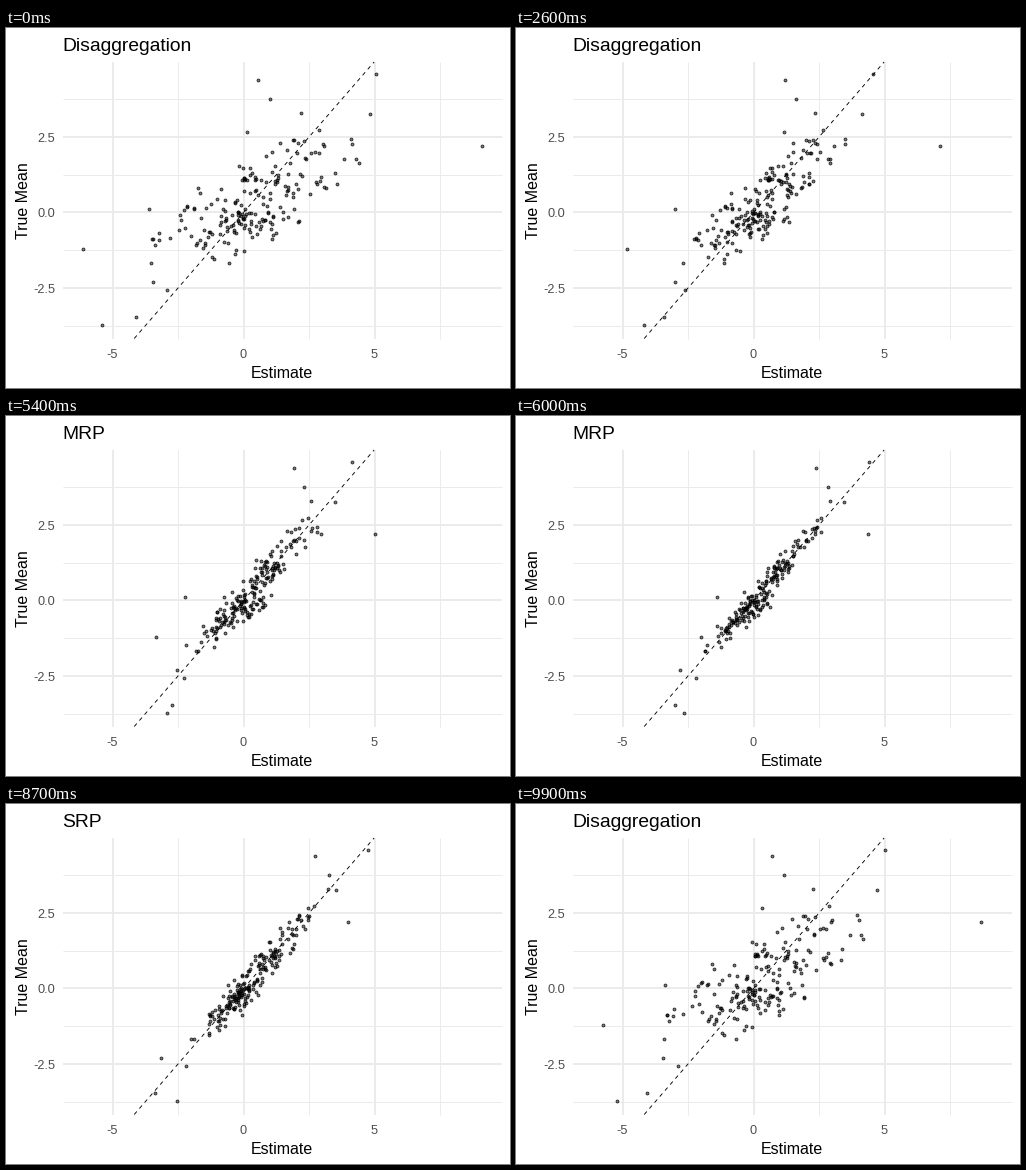
Animation, 504 px wide and 360 px high, one loop 10000 ms. Source, as a matplotlib script:

```python
import numpy as np
import matplotlib
import matplotlib.pyplot as plt
from matplotlib.animation import FuncAnimation

matplotlib.rcParams["font.family"] = "Liberation Sans"

W, H = 504, 360
X0, Y0 = 237.7, 184.3        # pixel position of the data origin
SX, SY = 26.2, 30.2          # pixels per unit
LEFT, RIGHT, TOP, BOTTOM = 57, 496, 34, 310.5

FRAMES = 100
STEPS = 14                   # frames in one transition
STARTS = (19, 53, 86)        # last resting frame of each state
TITLES = ("Disaggregation", "MRP", "SRP")

# Extreme points: true mean, then the estimate in each state
OUTLIERS = np.array([
    (4.37, 0.53, 1.83, 2.90), (4.57, 5.04, 4.08, 4.73),
    (3.74, 0.99, 2.21, 3.44), (2.19, 9.08, 5.11, 3.59),
    (3.28, 2.18, 2.52, 3.28), (3.25, 4.81, 3.47, 3.44),
    (0.10, -3.63, -2.40, -0.38), (-1.23, -6.15, -3.55, -0.50),
    (-2.32, -3.47, -2.52, -3.13), (-2.58, -2.94, -2.29, -2.14),
    (-3.48, -4.12, -2.71, -3.32), (-3.74, -5.42, -2.98, -2.33),
])


def px(x):
    return X0 + SX * x


def py(y):
    return Y0 - SY * y


def make_cloud():
    """Main scatter, closing in on the diagonal from state to state."""
    rng = np.random.default_rng(12)

    def noise(n):
        return np.clip(rng.standard_normal(n), -2.1, 2.1)

    # mean, spread and size of each cluster of true means
    clusters = ((2.0, 0.4, 26), (0.85, 0.38, 62),
                (-0.2, 0.3, 76), (-1.0, 0.33, 32))
    y = np.concatenate([m + s * noise(n) for m, s, n in clusters])
    wide = (1.1 + 0.15 * np.abs(y)) * noise(len(y))
    return np.column_stack([
        y,
        y + wide,
        0.95 * y + 0.1 * wide + 0.42 * noise(len(y)),
        0.93 * y + 0.05 + 0.3 * noise(len(y)),
    ])


points = np.vstack([OUTLIERS, make_cloud()])
dot_y, dot_x = py(points[:, 0]), px(points[:, 1:].T)

fig = plt.figure(figsize=(W / 72, H / 72), dpi=72, facecolor="white")
ax = fig.add_axes([0, 0, 1, 1])
ax.set_xlim(0, W)
ax.set_ylim(H, 0)
ax.axis("off")


def grid(xs, ys, width):
    style = dict(color="#EBEBEB", lw=width, solid_capstyle="butt", zorder=1)
    for x in xs:
        ax.plot([px(x)] * 2, [TOP, BOTTOM], **style)
    for y in ys:
        ax.plot([LEFT, RIGHT], [py(y)] * 2, **style)


def label(x, y, text, size=16, color="black", va="baseline", **kw):
    return ax.text(x, y, text, fontsize=size, color=color, va=va, **kw)


grid((-2.5, 2.5, 7.5), (-3.75, -1.25, 1.25, 3.75), 1)
grid((-5, 0, 5), (-2.5, 0, 2.5), 2)

for x in (-5, 0, 5):
    label(px(x) - 0.7, 330, str(x), 12.8, "#4D4D4D", ha="center")
for y in (-2.5, 0, 2.5):
    label(49.5, py(y) + 5, f"{y:.1f}", 12.8, "#4D4D4D", ha="right")

label(276, 350, "Estimate", ha="center")
label(25, 172.5, "True Mean", rotation=90, ha="right", va="center")
title = label(56, 23, TITLES[0], 19.2)

dots, = ax.plot(dot_x[0], dot_y, "o", ms=2.9, mew=0.9, mfc=(0, 0, 0, 0.5),
                mec=(0, 0, 0, 0.75), zorder=2)

ends = (np.array([BOTTOM, TOP]) - Y0) / -SY
ax.plot(px(ends), py(ends), color="black", lw=0.9, dashes=(4.4, 4.4),
        dash_capstyle="butt", zorder=3)


def update(frame):
    state, t = 0, 0.0
    for i, start in enumerate(STARTS):
        if frame >= start:
            state, t = i, min((frame - start) / STEPS, 1)
    after = (state + 1) % len(TITLES)
    dots.set_xdata(dot_x[state] + (dot_x[after] - dot_x[state]) * t)
    title.set_text(TITLES[after if t > 0.5 else state])
    return dots, title


anim = FuncAnimation(fig, update, frames=FRAMES, interval=100,
                     init_func=lambda: update(0), repeat=True, repeat_delay=0)
plt.show()
```
